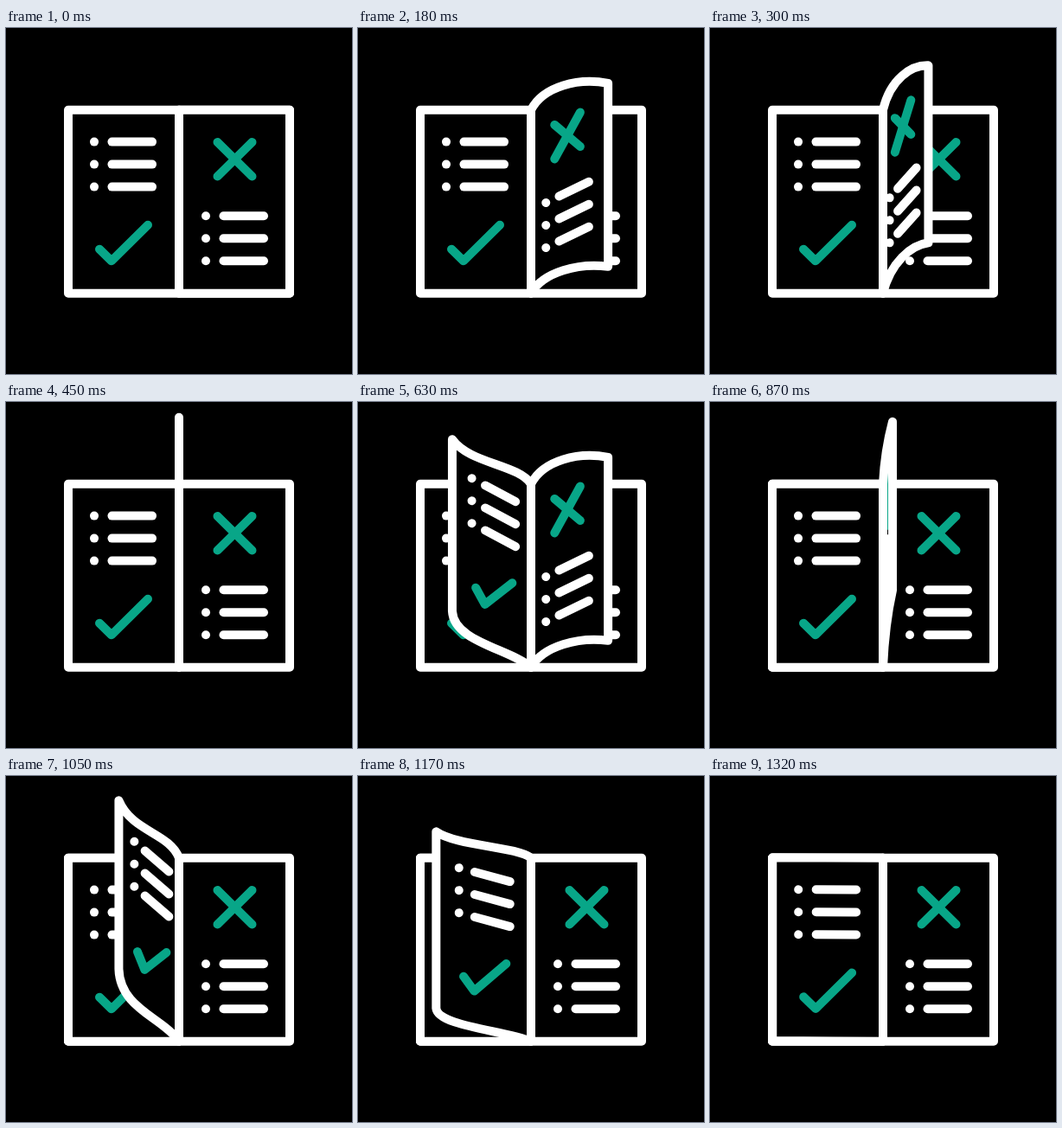
These frames come from a looping animation (400x400 px, 8000 ms). An HTML page with a canvas:

```html
<!DOCTYPE html>
<html lang="en">
<head>
<meta charset="utf-8">
<title>Turning pages</title>
<style>
  html, body { margin: 0; height: 100%; overflow: hidden; background: #000; }
  canvas { display: block; }
</style>
</head>
<body>
<canvas id="stage" width="400" height="400"></canvas>
<script>
const ctx = document.getElementById('stage').getContext('2d');
const LOOP = 8000, SETTLED = 1320, STEP = 30;
const WHITE = '#fff', TEAL = '#08a688';
const SPINE = 200, TOP = 94.7, BOTTOM = 306.7, PAGE = 128;
const RISE = 450, FALL = 420;

const clamp = v => Math.min(1, Math.max(0, v));

// Free edge of a page: distance from the spine, lift of its upper and lower corner.
function risingPage(p) {
  const width = PAGE * (1 - p ** 1.3);
  return { side: 1, width, lift: 77 * p, foot: 97 * p ** 1.25, bulge: 0.43 * width * p };
}

function fallingPage(p) {
  const spread = 1 - (1 - p) ** 2.22;
  const drop = 1 - spread ** 3.25;
  return { side: -1, width: PAGE * spread, lift: 77 * drop, foot: 97 * drop, bulge: 0 };
}

const turningPage = (t, rise, fall) => t < fall
  ? risingPage(clamp((t - rise) / RISE))
  : fallingPage(clamp((t - fall) / FALL));

function outlineOf({ side, width, lift, foot, bulge }) {
  const x = k => SPINE + side * width * k;
  const path = new Path2D();
  path.moveTo(SPINE, TOP);
  if (side > 0) {
    path.bezierCurveTo(x(0.16), TOP - 0.4 * lift - bulge, x(0.62), TOP - 0.72 * lift - bulge, x(1), TOP - lift);
    path.lineTo(x(1), BOTTOM - foot);
    path.bezierCurveTo(x(0.62), BOTTOM - 0.75 * foot - 0.8 * bulge, x(0.16), BOTTOM - 0.4 * foot - 0.8 * bulge, SPINE, BOTTOM);
  } else {
    path.bezierCurveTo(x(0.16), TOP - 0.44 * lift, x(0.78), TOP - 0.45 * lift, x(1), TOP - lift);
    path.lineTo(x(1), BOTTOM - foot);
    path.bezierCurveTo(x(0.98), BOTTOM - 0.45 * foot, x(0.27), BOTTOM - 0.33 * foot, SPINE, BOTTOM);
  }
  path.closePath();
  return path;
}

function drawPage(page) {
  const { side, width, lift, bulge } = page;
  const bend = Math.sin(Math.PI * width / PAGE);

  // Points are given as they lie on the flat page, then squeezed and sheared.
  function line(color, ...points) {
    ctx.strokeStyle = color;
    ctx.beginPath();
    for (const [flatX, flatY] of points) {
      const u = Math.abs(flatX - SPINE) / PAGE;
      ctx.lineTo(SPINE + side * (width * u - 7 * bend * (1 - u)),
                 flatY - (lift + bulge) * u - 5 * bend);
    }
    ctx.stroke();
  }

  function list(x, y) {
    for (let row = 0; row < 3; row++, y += 26) {
      line(WHITE, [x, y], [x + 0.01, y]);
      line(WHITE, [x + 20.5, y], [x + 67, y]);
    }
  }

  const outline = outlineOf(page);
  ctx.fillStyle = '#000';
  ctx.fill(outline);
  if (side > 0) {
    line(TEAL, [244.5, 132], [284.5, 171.5]);
    line(TEAL, [284.5, 132], [244.5, 171.5]);
    list(231, 217.2);
  } else {
    list(102, 131.6);
    line(TEAL, [108, 255.7], [122, 269.3], [164, 227.7]);
  }
  ctx.strokeStyle = WHITE;
  ctx.stroke(outline);
}

function draw(now) {
  const stepped = Math.floor((now % LOOP + 4) / STEP) * STEP;
  const t = Math.min(stepped, SETTLED);
  ctx.fillStyle = '#000';
  ctx.fillRect(0, 0, 400, 400);
  ctx.lineWidth = 10;
  ctx.lineCap = ctx.lineJoin = 'round';
  drawPage(fallingPage(1));
  drawPage(risingPage(0));
  drawPage(turningPage(t, 0, 450));
  if (t > 450) drawPage(turningPage(t, 450, 925));
}

const start = performance.now();
function tick() {
  draw(performance.now() - start);
  requestAnimationFrame(tick);
}
tick();
</script>
</body>
</html>
```
